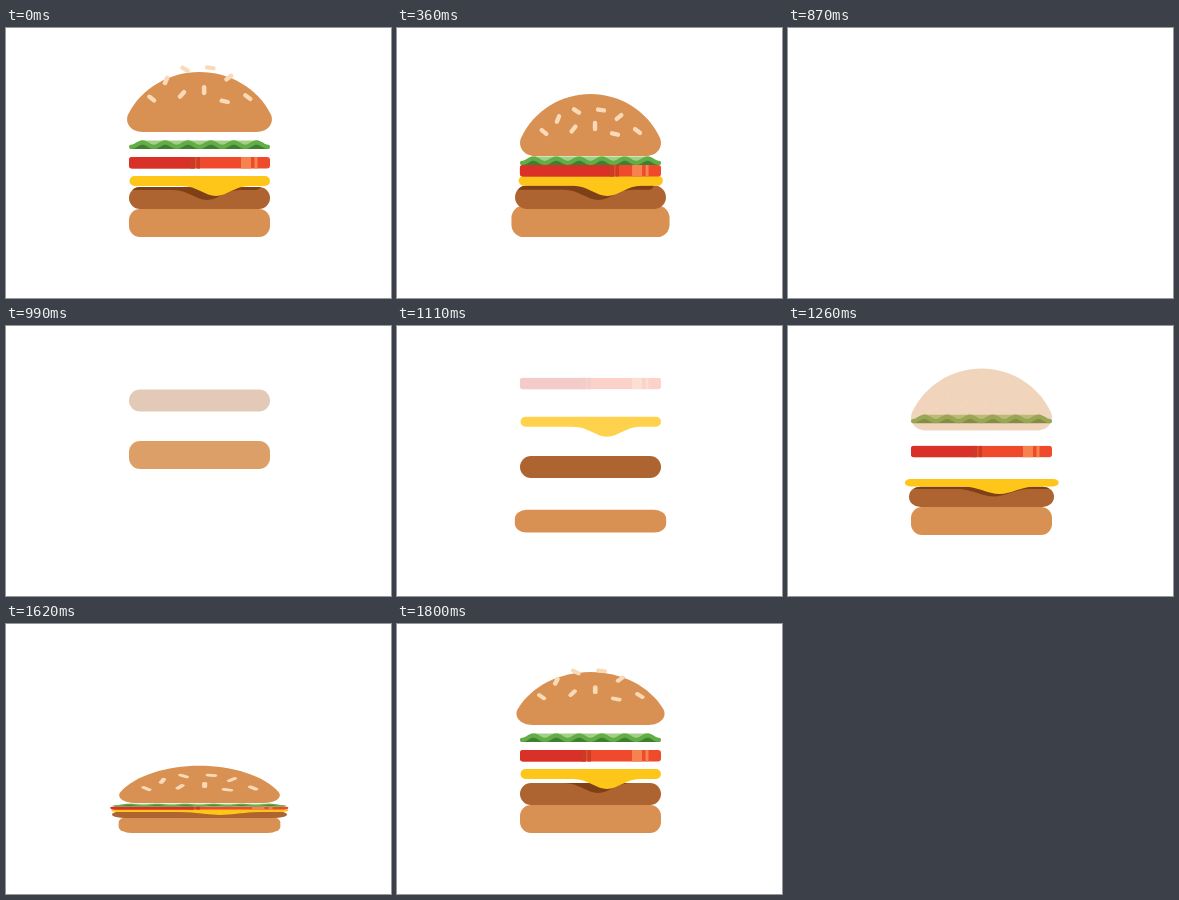
Animation of 385x270 px, one loop 1.83 s. Source, as an HTML page:

```html
<!DOCTYPE html>
<html lang="en">
<head>
<meta charset="utf-8">
<title>Burger</title>
<style>
  html, body { margin: 0; width: 100%; height: 100%; overflow: hidden; background: #fff; }
  svg { display: block; width: 100vw; height: 100vh; }
</style>
</head>
<body>
<svg viewBox="0 0 385 270">
  <defs>
    <path id="cheese" d="M128.500 148H259a5 5 0 0 1 0 10H243C229 158 221 168 210 168S191 158 176 158H128.500a5 5 0 0 1 0-10Z"/>
    <clipPath id="pattyClip"><rect id="pattyShape" x="123" y="159" width="141" height="22" rx="11"/></clipPath>
    <clipPath id="tomatoClip"><rect x="123" y="137" width="141" height="11.500" rx="3"/></clipPath>
  </defs>
  <g class="layer"><rect x="123" y="181" width="141" height="28" rx="11" fill="#d89152"/></g>
  <g class="layer"><rect x="123" y="159" width="141" height="22" rx="11" fill="#ae6430"/></g>
  <g clip-path="url(#pattyClip)"><use id="shadow" href="#cheese" fill="#7f3f17"/></g>
  <g class="layer"><use href="#cheese" fill="#ffc61a"/></g>
  <g class="layer"><g clip-path="url(#tomatoClip)">
    <rect x="123" y="137" width="141" height="12" fill="#ef4a2c"/>
    <g id="tomatoEdge">
      <rect x="90" y="137" width="99" height="12" fill="#d93028"/>
      <path d="M184.500 137h4v12h-4zM190.500 137h3.500v12h-3.500z" fill="#c93c26"/>
    </g>
    <path d="M235 137h10v12h-10zM248.500 137h3v12h-3z" fill="#f5824f"/>
  </g></g>
  <g class="layer">
    <path d="M135 128.500H252V134H135Z" fill="#a3cf86"/>
    <path id="leafBase" fill="#3e7f31"/>
    <path id="leafWave" fill="none" stroke="#63ad46" stroke-width="4.200" stroke-linecap="round"/>
  </g>
  <g class="layer"><path fill="#d89152" d="M138 128H249C260 128 266.500 119 263 110C250 82 222 66 193.500 66S137 82 124 110C120.500 119 127 128 138 128Z"/></g>
  <g id="seeds" stroke="#f9dab8" stroke-width="4.400" stroke-linecap="round"></g>
</svg>
<script>
const LOOP = 1830, STEP = 30, CX = 193.5;
const DROP_FROM = 34, DROP_TIME = 235;
// resting top and bottom, then bottom, width and height factors when pressed
const LAYERS = [
  [181, 209, 209, 1.17, .54],
  [159, 181, 194.5, 1.25, .30],
  [148, 168, 191, 1.26, .30],
  [137, 148, 185.5, 1.26, .27],
  [128, 137, 182.5, 1.23, .32],
  [66, 128, 179, 1.14, .60]
].map(([top, bottom, low, wide, flat]) => ({ top, bottom, low, wide, flat }));
// x, y, angle
const SEEDS = [
  [147, 104, 40], [161, 91, -68], [176.5, 101, -50], [179.5, 83, 33], [204, 82, 8],
  [222, 89, -40], [198, 98, 90], [218, 106, 13], [240.5, 103, 38]
];

const $ = id => document.getElementById(id);
const clamp = v => Math.min(1, Math.max(0, v));
const span = (t, from, length) => clamp((t - from) / length);
const smooth = (t, from, length) => { const u = span(t, from, length); return u * u * (3 - 2 * u); };
const mix = (a, b, k) => a + (b - a) * k;
const groups = [...document.querySelectorAll('.layer')];

// six even waves, low at both ends
function leafPoints() {
  const points = [];
  for (let i = 0; i <= 96; i++) {
    const y = 132.7 + 2.2 * Math.cos(i / 96 * Math.PI * 12);
    points.push(`${mix(125, 262, i / 96).toFixed(2)} ${y.toFixed(2)}`);
  }
  return points.join('L');
}
const wave = leafPoints();
$('leafWave').setAttribute('d', 'M' + wave);
$('leafBase').setAttribute('d', `M125 137L${wave}L262 137Z`);

const seedLines = SEEDS.map(() => {
  const line = document.createElementNS('http://www.w3.org/2000/svg', 'line');
  line.setAttribute('x1', -3);
  line.setAttribute('x2', 3);
  $('seeds').append(line);
  return line;
});

function pose(layer, i, t) {
  const { top, bottom, low, wide, flat } = layer;
  const sinceHop = (t < 600 ? t + LOOP : t) - 1800;
  const hop = 3 - .09 * sinceHop - .0003 * sinceHop ** 2;
  const lift = i < 2 ? 0 : smooth(sinceHop, -150, 130) * Math.max(0, 8 * (i - 2) + hop);

  // swell, then shrink away, from the lowest layer up
  if (t < 740 + 30 * i) {
    let s = 1 + .2 * smooth(t, 260 + 30 * i, 175);
    s -= 1.2 * smooth(t, 428 + 30 * i, 312);
    const soft = i === 5 ? .08 * (1 - smooth(t, 0, 30)) + .05 * Math.sin(Math.PI * span(t, 150, 110)) : 0;
    return { y: bottom - lift, sx: s * (1 + soft * .35), sy: s * (1 - soft * .4), alpha: s > .02 ? 1 : 0 };
  }

  const age = t - 881 - 66 * i;
  if (age < 0) return { y: bottom, sx: 0, sy: 0, alpha: 0 };

  // fall, squash on landing, then the whole stack is pressed
  const u = clamp(age / DROP_TIME);
  const height = (top - DROP_FROM) * (1 - u * (1.35 - .35 * u));
  const bump = i === 5 ? 0 : Math.sin(Math.PI * span(age, DROP_TIME - 40, 130));
  const press = 1 - (1 - span(t, 1263, 177)) ** 2;
  const rising = press * (1 - smooth(t, 1590 + 15 * i, 130));
  const squash = press * (1 - smooth(t, i === 5 ? 1723 : 1590 + 15 * i, 130));
  return {
    y: mix(bottom, low, rising) - height - lift,
    sx: mix(1, wide, squash) * (1 + .1 * bump),
    sy: mix(1, flat, squash) * (1 - .26 * bump),
    alpha: clamp(age / 125)
  };
}

const matrix = (p, bottom) =>
  `translate(${CX} ${p.y}) scale(${p.sx} ${p.sy}) translate(${-CX} ${-bottom})`;

function render(t) {
  const poses = LAYERS.map((layer, i) => pose(layer, i, t));
  poses.forEach((p, i) => {
    groups[i].setAttribute('transform', matrix(p, LAYERS[i].bottom));
    groups[i].setAttribute('opacity', p.alpha);
  });

  // the cheese shadow tucks in as the cheese flattens
  const [, patty, cheese, , , bun] = poses;
  const depth = clamp(1 - 1.43 * (1 - cheese.sy));
  $('pattyShape').setAttribute('transform', matrix(patty, LAYERS[1].bottom));
  $('shadow').setAttribute('transform',
    `translate(${-9 * depth} ${4 * depth}) ${matrix(cheese, LAYERS[2].bottom)}`);
  $('shadow').setAttribute('opacity', Math.min(cheese.alpha, patty.alpha));
  $('tomatoEdge').setAttribute('transform',
    `translate(${28 * smooth(t, 100, 200) * (1 - smooth(t, 400, 200))} 0)`);

  // seeds fly higher than the bun and settle later
  const d = (t < 600 ? t : t - LOOP) - 25;
  const spread = Math.max(bun.sy, t < 250 || t > 1620 ? 1.45 - (d < 0 ? 9e-5 : 2.5e-5) * d * d : 0);
  SEEDS.forEach(([x, y, angle], i) => {
    const px = CX + (x - CX) * bun.sx, py = bun.y - (128 - y) * spread;
    seedLines[i].setAttribute('transform',
      `translate(${px} ${py}) scale(${bun.sx} ${bun.sy}) rotate(${angle})`);
  });
  $('seeds').setAttribute('opacity', bun.alpha);
}

const start = performance.now();
function tick() {
  const t = (performance.now() - start) % LOOP;
  render(Math.floor(t / STEP) * STEP);
  requestAnimationFrame(tick);
}
tick();
</script>
</body>
</html>
```
